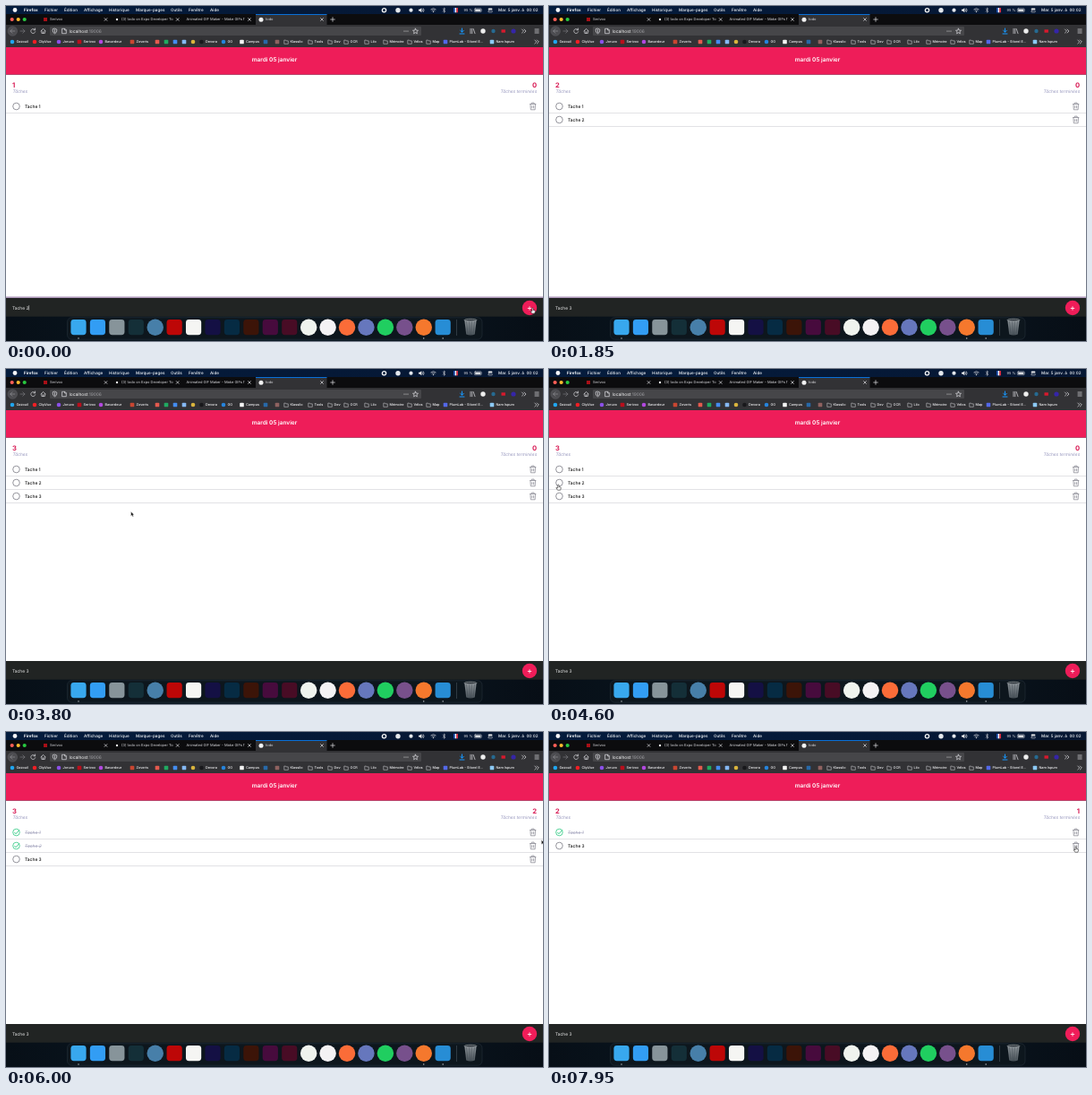
These frames come from a looping animation (600 px wide and 374 px high, 8 s). An HTML page:

```html
<!DOCTYPE html>
<html lang="fr">
<head>
<meta charset="utf-8">
<title>todo</title>
<style>
html, body { margin: 0; width: 100%; height: 100%; overflow: hidden; background: #fff; }
svg { display: block; width: 100vw; height: 100vh; cursor: default; }
text { font-family: Inter, Roboto, sans-serif; text-rendering: geometricPrecision; white-space: pre; }
.menu { font-size: 4.6px; font-weight: 500; fill: #f6f8fb; }
.tab { font-size: 4px; fill: #dcdce0; }
.mark { font-size: 3.8px; font-weight: 500; fill: #f6f6f8; }
.task { font-size: 4.9px; font-weight: 500; fill: #111; }
.done .task { fill: #9d9db8; font-style: italic; font-weight: 400; text-decoration: line-through; }
.count { font-size: 7.6px; font-weight: 700; fill: #d81b55; }
.label { font-size: 4.85px; font-style: italic; fill: #9696bd; }
.end { text-anchor: end; }
.line { fill: none; stroke: #e0e0e4; stroke-width: .7; stroke-linecap: round; stroke-linejoin: round; }
.thin { stroke-width: .5; }
.ring { fill: none; stroke: #72727c; stroke-width: .75; }
.tick, .done .ring { stroke: #20c67a; }
.tick { fill: none; stroke-width: .9; visibility: hidden; }
.done .tick { visibility: inherit; }
</style>
</head>
<body>
<svg viewBox="0 0 600 374" preserveAspectRatio="none">
  <defs>
    <linearGradient id="sky"><stop stop-color="#041c3d"/><stop offset="1" stop-color="#061733"/></linearGradient>
    <linearGradient id="desk"><stop stop-color="#070f17"/><stop offset=".5" stop-color="#0c1b26"/><stop offset="1" stop-color="#070e16"/></linearGradient>
    <linearGradient id="bin" x2="0" y2="1"><stop stop-color="#8b9297"/><stop offset="1" stop-color="#4c555c"/></linearGradient>
    <g id="trash" fill="none" stroke="#7d7d88" stroke-width=".7" stroke-linejoin="round">
      <path d="M-3.6-2.5H3.6M-1.4-2.5V-3.9H1.4V-2.5M-2.8-2.5L-2.4 3.8H2.4L2.8-2.5M-.9-.8V2.2M.9-.8V2.2"/>
    </g>
    <path id="folder" class="line thin" d="M-2.2 1.9V-1.9H-.5L.1-1.1H2.3V1.9Z"/>
    <path id="cross" class="line" d="M-1.4-1.4L1.4 1.4M1.4-1.4L-1.4 1.4"/>
  </defs>

  <rect width="600" height="374" fill="#fff"/>
  <rect width="600" height="10" fill="url(#sky)"/>
  <rect y="9" width="600" height="12" fill="#0c0c0e"/>
  <rect y="21" width="600" height="25" fill="#323235"/>
  <path d="M279 10H358.5V21H279Z" fill="#323235"/>
  <path d="M279 9.5H358.5" stroke="#0a70d8" stroke-width="1"/>
  <rect x="49" y="23" width="415" height="10" rx="1" fill="#464649"/>

  <g id="menu"></g>
  <g id="status">
    <circle cx="10" cy="4.5" r="2.4" fill="#f4f4f6"/>
    <circle cx="422.5" cy="4.7" r="2.2" fill="#27374f" stroke="#fff" stroke-width="1.2"/>
    <circle cx="438" cy="4.7" r="2.7" fill="#e4e8ed"/>
    <circle cx="452.5" cy="4.7" r="2.1" fill="#e4e8ed"/>
    <path d="M461 3.8H462.3L464.3 2.2V7.2L462.3 5.6H461Z" fill="#eee"/>
    <path class="line" d="M465.3 3.6Q466.3 4.7 465.3 5.8M466.4 2.8Q468 4.7 466.4 6.6M474.8 3.7Q477.5 1.4 480.2 3.7M475.9 5Q477.5 3.6 479.1 5"/>
    <circle cx="477.5" cy="6.4" r=".7" fill="#eee"/>
    <path class="line thin" d="M488 3.2L491 6L489.5 7.4V2L491 3.4L488 6.2"/>
    <path d="M500 2H501.7V7.3H500Z" fill="#174db5"/>
    <path d="M501.7 2H503.3V7.3H501.7Z" fill="#fff"/>
    <path d="M503.3 2H505V7.3H503.3Z" fill="#e03245"/>
    <rect x="523.3" y="2.8" width="8" height="3.8" rx="1" class="line thin"/>
    <path d="M524.2 3.7H530.4V5.7H524.2Z" fill="#fff"/>
    <rect x="538.7" y="2.4" width="4.7" height="1.9" rx=".9" fill="#eee"/>
    <rect x="538.7" y="5.1" width="4.7" height="1.9" rx=".9" class="line thin"/>
  </g>

  <g id="tabs">
    <circle cx="6.7" cy="15" r="2.1" fill="#ff5f57"/>
    <circle cx="13.7" cy="15" r="2.1" fill="#febc2e"/>
    <circle cx="20.7" cy="15" r="2.1" fill="#28c840"/>
    <rect x="42" y="13" width="4" height="4" fill="#a80f16"/>
    <circle cx="124" cy="15" r="1.2" fill="#e8e8e8"/>
    <circle cx="285" cy="15.2" r="2.5" fill="#f2f2f2"/>
    <path class="line" d="M362.7 15H367.3M365 12.7V17.3"/>
  </g>

  <g id="toolbar">
    <circle cx="7.3" cy="28" r="5.3" fill="#4c4c50" stroke="#68686c" stroke-width=".4"/>
    <path class="line" d="M9.8 28H4.8M7 25.8L4.8 28L7 30.2" style="stroke:#8d8d92"/>
    <path class="line" d="M16 28H21M18.8 25.8L21 28L18.8 30.2" style="stroke:#77777c"/>
    <path class="line" d="M32.2 26.4A2.5 2.5 0 1 0 32.7 28.8M32.6 25V26.8H30.8M39 28L41.6 25.4L44.2 28M39.8 27.7V30.4H43.4V27.7M41.6 28.7V30.4"/>
    <path class="line" d="M54.5 25.2L56.7 26V28Q56.5 29.8 54.5 30.8Q52.5 29.8 52.3 28V26ZM54.5 26.5V29.4M63 25.3H65.8L67.3 26.8V30.7H63ZM65.6 25.5V27H67"/>
    <g fill="#ddd"><circle cx="445" cy="28" r=".6"/><circle cx="447" cy="28" r=".6"/><circle cx="449" cy="28" r=".6"/></g>
    <path class="line" d="M457.5 25.2L458.4 27.1L460.5 27.3L458.9 28.7L459.4 30.8L457.5 29.7L455.6 30.8L456.1 28.7L454.5 27.3L456.6 27.1Z"/>
    <path class="line" d="M509.5 25V29M507.6 27.3L509.5 29.2L511.4 27.3M507 31H512" style="stroke:#1698ff;stroke-width:1"/>
    <path class="line" d="M519 25.3V30.7M520.8 25.3V30.7M522.2 25.5L524 30.7"/>
    <circle cx="533" cy="28" r="2.7" fill="#eee"/>
    <circle cx="544.5" cy="28" r="2.2" fill="#266a91"/>
    <rect x="553.5" y="26.3" width="4.4" height="3.4" fill="#d7192d"/>
    <circle cx="567" cy="28" r="2.6" fill="#3525a8"/>
    <path class="line" d="M576.5 26L578.5 28L576.5 30M579 26L581 28L579 30M591 26H595.2M591 28H595.2M591 30H595.2M590.8 38L592.8 40L590.8 42M593.3 38L595.3 40L593.3 42"/>
    <text x="70.7" y="29.6" font-size="4.85" fill="#fafafa">localhost<tspan fill="#a0a0a4">:19006</tspan></text>
  </g>
  <g id="marks"></g>

  <rect y="46" width="600" height="30" fill="#ee1d59"/>
  <rect y="76" width="600" height="1" fill="#b8476c"/>
  <text x="300" y="62.2" text-anchor="middle" font-size="6.5" font-weight="600" fill="#fff">mardi 05 janvier</text>
  <text id="total" class="count" x="7" y="90.6"></text>
  <text class="label" x="7.4" y="97">Tâches</text>
  <text id="finished" class="count end" x="593" y="90.6"></text>
  <text class="label end" x="593.2" y="97">Tâches terminées</text>
  <g id="tasks"></g>

  <rect y="346" width="600" height="28" fill="url(#desk)"/>
  <rect id="focus" y="324.4" width="600" height="2" fill="#b09abb"/>
  <rect y="326" width="600" height="20.7" fill="#212423"/>
  <text id="entry" x="7" y="338.8" font-size="4.9" fill="#ececec"></text>
  <path id="caret" d="M25.6 334.2V339.6" stroke="#fff" stroke-width=".5"/>
  <circle cx="585" cy="337" r="8.2" fill="#ef1d59"/>
  <path d="M582.8 337.5H587.2M585 335.3V339.7" stroke="#fff" stroke-width=".8"/>

  <g id="dock">
    <rect x="68.5" y="347.8" width="463.5" height="24.4" rx="5" fill="#0d161d" stroke="#2a3740" stroke-width=".5"/>
    <path d="M503.5 350V368" stroke="#52606a" stroke-width=".5"/>
    <path d="M512.3 350.5H525.7L523.8 366.5Q519 368.3 514.2 366.5Z" fill="url(#bin)"/>
    <path d="M514.5 352L516 366M517.6 352L518.2 367M520.4 352L519.8 367M523.5 352L522 366" stroke="#343d44" stroke-width=".4"/>
    <ellipse cx="519" cy="350.6" rx="6.9" ry="1.3" fill="#343b41" stroke="#a9b0b4" stroke-width=".6"/>
  </g>

  <g id="pointer">
    <path id="arrow" d="M0 0V5L1.2 3.9L2 5.6L2.9 5.2L2.1 3.5H3.6Z" fill="#111" stroke="#fff" stroke-width=".4"/>
    <path id="hand" d="M-.7-2.5Q0-3.3.6-2.5V-.5L2.5 0Q3 .3 2.8 1.2L2.2 3.2H-.9L-2.5.8Q-2.3 0-1.5.4L-.7 1Z" fill="#fff" stroke="#111" stroke-width=".55"/>
  </g>
</svg>
<script>
const LOOP = 8000;
const $ = id => document.getElementById(id);

function add(parent, tag, attrs, content) {
  const node = document.createElementNS('http://www.w3.org/2000/svg', tag);
  for (const key in attrs) node.setAttribute(key, attrs[key]);
  if (content) node.textContent = content;
  parent.append(node);
  return node;
}
const write = (group, kind, x, y, words) => add($(group), 'text', { class: kind, x, y }, words);

function shape(group, x, y, size, color, round) {
  if (round) add($(group), 'circle', { cx: x, cy: y, r: size / 2, fill: color });
  else add($(group), 'rect', { x: x - size / 2, y: y - size / 2, width: size, height: size, rx: size / 5, fill: color });
}

[[20, 'Firefox'], [43, 'Fichier'], [65, 'Édition'], [87, 'Affichage'], [115, 'Historique'],
 [145, 'Marque-pages'], [184, 'Outils'], [204, 'Fenêtre'], [228, 'Aide'],
 [550, 'Mar. 5 janv. à  00:02']].forEach(([x, words]) => write('menu', 'menu', x, 5.9, words));
$('menu').firstChild.style.fontWeight = 700;
write('menu', 'tab', 511.5, 5.9, '95 %');

[[49, 'Serivox', 111.5], [129, '(3) todo on Expo Developer To', 191.7],
 [201.5, "Animated GIF Maker - Make GIFs f", 272], [290, 'todo', 353]].forEach(([x, title, close]) => {
  write('tabs', 'tab', x, 16.4, title);
  add($('tabs'), 'use', { href: '#cross', x: close, y: 15 });
});

[[7, 'Gazouil', '#20a5ef'], [32, 'ClipVue', '#f01f24'], [59, 'Joruvo', '#8b50e8'],
 [82, 'Serivox', '#b80f1c'], [106, 'Bavardeur', '#b248df'], [141, 'Zoveris', '#c94631'],
 [169, '', '#e45a4e'], [179, '', '#20aa61'], [189, '', '#438cf0'], [199, '', '#85b8f3'], [209, '', '#d9b43d'],
 [218.5, 'Devora', '#18181b'], [243, 'GO', '#2684dc'], [263.5, 'Campus', '#f4f4f4'],
 [290, '', '#2869a8'], [303, '', '#8f6260'], [313, 'Klassilo'], [340, 'Tools'], [362, 'Dev'],
 [380, 'OCR'], [403, 'Lilo'], [424, 'Mémoire'], [451, 'Vélos'], [472, 'Map'],
 [491, 'PlumLab - Sitorel E…', '#5368e8'], [543, 'Nam Ispum', '#8cc9f5']].forEach(([x, title, color]) => {
  if (color) shape('marks', x, 40, 4.6, color, x < 130 && x !== 82 || x > 200 && x < 250);
  else add($('marks'), 'use', { href: '#folder', x, y: 40 });
  write('marks', 'mark', x + 4.5, 41.4, title);
});

const apps = ['#38a8ee', '#329df4', '#87949a', '#142f38', '#477fa9', '#bd0707', '#f5f5f3', '#141044',
  '#062b43', '#3c1408', '#470b3d', '#480c25', '#eff3ee', '#f4f2f4', '#fb6c38', '#6677bd',
  '#20ce60', '#77508c', '#f5782d', '#278dd5'];
apps.forEach((color, i) => {
  const round = i === 4 || i > 11 && i < 19;
  shape('dock', 81 + i * 21.43, 358.7, round ? 18.5 : 17.2, color, round);
  if (i === 0 || i > 17) shape('dock', 81 + i * 21.43, 371, 1.4, '#c4c9cd', true);
});

const rows = [1, 2, 3].map(n => {
  const row = add($('tasks'), 'g');
  add(row, 'circle', { class: 'ring', cx: 11.5, cy: 0, r: 3.8 });
  add(row, 'path', { class: 'tick', d: 'M9.4 0L11 1.7L14.8-2.4' });
  add(row, 'text', { class: 'task', x: 21, y: 1.9 }, 'Tache ' + n);
  add(row, 'use', { href: '#trash', x: 588.7 });
  add(row, 'path', { d: 'M0 7.5H600', stroke: '#dbdbdf', 'stroke-width': .8 });
  return row;
});

// Task lifetimes: added, checked, removed
const lives = [[0, 5250, LOOP], [250, 4750, 7400], [2400, LOOP, LOOP]];
// Pointer stops: time, x, y
const stops = [[0, 588.5, 340], [400, 588.5, 340], [1000, 40, 337], [1850, 40, 337], [2250, 588.5, 340],
  [2450, 588.5, 340], [2950, 251.5, 183], [3300, 251.5, 183], [4350, 10.5, 132], [4800, 10.5, 132],
  [5100, 11.5, 115], [5300, 11.5, 115], [6000, 598.3, 120.5], [6150, 598.3, 120.5], [6900, 588.7, 131], [LOOP, 588.7, 131]];

const show = (node, on) => node.setAttribute('visibility', on ? 'visible' : 'hidden');

function pointerAt(t) {
  const i = stops.findIndex(stop => stop[0] > t);
  const [t0, x0, y0] = stops[i - 1], [t1, x1, y1] = stops[i];
  const p = (t - t0) / (t1 - t0), ease = p * p * (3 - 2 * p);
  return [x0 + (x1 - x0) * ease, y0 + (y1 - y0) * ease];
}

function draw(t) {
  let total = 0, finished = 0;
  rows.forEach((row, i) => {
    const [added, checked, removed] = lives[i];
    const alive = t >= added && t < removed, done = t >= checked;
    show(row, alive);
    row.setAttribute('class', done ? 'done' : '');
    row.setAttribute('transform', `translate(0 ${112 + total * 15})`);
    total += alive;
    finished += alive && done;
  });
  $('total').textContent = total;
  $('finished').textContent = finished;

  const focused = t < 250 || t >= 950 && t < 2400;
  $('entry').textContent = 'Tache ' + (t < 1250 ? '2' : t < 1500 ? '' : '3');
  show($('focus'), focused);
  show($('caret'), focused && t % 1000 < 500);
  $('caret').setAttribute('transform', `translate(${t >= 1250 && t < 1500 ? -3 : 0} 0)`);

  const [x, y] = pointerAt(t);
  const overInput = y > 326 && x < 576;
  const overRow = y > 105 && y < 105 + total * 15;
  const overAction = y > 328 || overRow && (x < 16 || x > 584 && x < 593);
  $('pointer').setAttribute('transform', `translate(${x} ${y})`);
  show($('arrow'), !overInput && !overAction);
  show($('hand'), !overInput && overAction);
}

let start;
function tick(now) {
  start ??= now;
  draw((now - start) % LOOP);
  requestAnimationFrame(tick);
}
draw(0);
requestAnimationFrame(tick);
</script>
</body>
</html>
```
